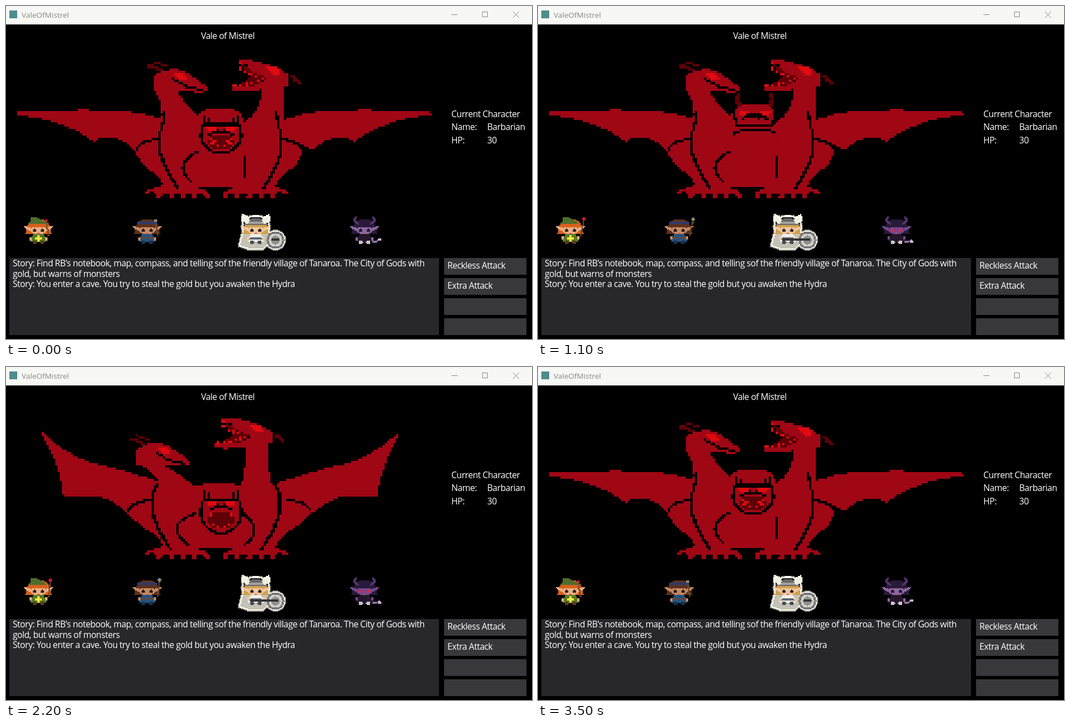
Animation, 939 px wide and 596 px high, one loop 3.53 s. Source, as an HTML page with a canvas:

```html
<!DOCTYPE html>
<html lang="en">
<head>
<meta charset="utf-8">
<title>ValeOfMistrel</title>
<style>
  html, body { margin: 0; width: 100%; height: 100%; overflow: hidden; background: #000; }
  svg, canvas { position: absolute; left: 0; top: 0; }
  text { font-family: "Open Sans", "Noto Sans", sans-serif; font-size: 15.6px; letter-spacing: -.48px; fill: #fff; }
  .bar text { font-size: 13.5px; letter-spacing: 0; fill: #878787; }
  .bar path { fill: none; stroke: #858585; }
</style>
</head>
<body>
<svg width="939" height="596">
  <g class="bar">
    <rect width="939" height="33" fill="#f7f7f3"/>
    <rect x="6" y="8" width="14" height="14" fill="#4d8c8e"/>
    <text x="28" y="21">ValeOfMistrel</text>
    <path d="M795 15.5h11M850.5 10.5h9v9h-9zM905 10l11 11m0-11l-11 11"/>
  </g>
  <g fill="#28282b">
    <rect x="6" y="451" width="767" height="138"/>
    <g fill="#38383a">
      <rect x="782" y="451" width="147" height="30"/>
      <rect x="782" y="487" width="147" height="30"/>
      <rect x="782" y="523" width="147" height="30"/>
      <rect x="782" y="559" width="147" height="30"/>
    </g>
  </g>
  <text x="396" y="59" text-anchor="middle">Vale of Mistrel</text>
  <text x="795" y="199">Current Character</text>
  <text x="795" y="222">Name:</text><text x="859" y="222">Barbarian</text>
  <text x="795" y="246">HP:</text><text x="859" y="246">30</text>
  <text x="12" y="466">Story: Find RB's notebook, map, compass, and telling sof the friendly village of Tanaroa. The City of Gods with</text>
  <text x="12" y="485">gold, but warns of monsters</text>
  <text x="12" y="503">Story: You enter a cave. You try to steal the gold but you awaken the Hydra</text>
  <text x="788" y="470">Reckless Attack</text>
  <text x="788" y="506">Extra Attack</text>
</svg>
<canvas id="stage" width="939" height="450"></canvas>
<script>
const LOOP = 3530, FPS = 30;
const FIRST_CHANGE = 20, HOLD = 145.3;
const ROAR = 0, RISE = 1, PEEK = 2;
const RED = '#a00715', BRIGHT = '#e00a10', DARK = '#5e0008', BLACK = '#000';

const stage = document.getElementById('stage').getContext('2d');
stage.imageSmoothingEnabled = false;

const box = (x, y, w, h) => `M${x} ${y}h${w}v${h}h${-w}z`;
const oval = (x, y, rx, ry = rx) =>
  `M${x - rx} ${y}a${rx} ${ry} 0 1 0 ${2 * rx} 0a${rx} ${ry} 0 1 0 ${-2 * rx} 0z`;

// A band of the stage where each shape is cut to hard square cells
function pixelLayer(cell, top, height) {
  const w = Math.ceil(939 / cell), h = Math.ceil(height / cell);
  const [scratch, layer] = [0, 1].map(() => {
    const canvas = document.createElement('canvas');
    canvas.width = w;
    canvas.height = h;
    return canvas.getContext('2d', { willReadFrequently: true });
  });

  function paint(color, d, { width, dx = 0, dy = 0, mirror, dash = [] } = {}) {
    const shape = new Path2D(d), path = new Path2D();
    path.addPath(shape, new DOMMatrix([1, 0, 0, 1, dx, dy]));
    if (mirror) path.addPath(shape, new DOMMatrix([-1, 0, 0, 1, mirror, dy]));
    scratch.setTransform(1, 0, 0, 1, 0, 0);
    scratch.clearRect(0, 0, w, h);
    scratch.setTransform(1 / cell, 0, 0, 1 / cell, 0, -top / cell);
    scratch.fillStyle = scratch.strokeStyle = color;
    scratch.lineWidth = width;
    scratch.setLineDash(dash);
    if (width) scratch.stroke(path); else scratch.fill(path);
    const image = scratch.getImageData(0, 0, w, h);
    for (let i = 3; i < image.data.length; i += 4) image.data[i] = image.data[i] > 118 ? 255 : 0;
    scratch.putImageData(image, 0, 0);
    layer.drawImage(scratch.canvas, 0, 0);
  }

  const show = () => stage.drawImage(layer.canvas, 0, top, w * cell, h * cell);
  return { paint, show };
}

function hydra(pose) {
  const { paint, show } = pixelLayer(4, 84, 264);
  const up = pose === RISE;
  const ink = (d, mirror, dy) => paint(BLACK, d, { width: 4.5, mirror, dy });

  // Wings, thighs and feet come in mirrored pairs
  paint(RED, up
    ? 'M62 114Q120 172 190 180L285 208V238Q235 238 217 262Q190 236 163 231H103Q98 180 62 114Z'
    : 'M19 190Q100 184 205 187Q250 192 290 206V242Q250 240 230 259Q212 238 188 235Q168 232 157 243Q100 200 19 195Z',
  { mirror: up ? 766 : 778 });
  const hip = up ? 217 : 232;
  paint(RED, `M290 232Q${hip + 4} 238 ${hip} 262Q245 290 262 296Q280 312 284 330H345V232Z`, { mirror: 762 });
  paint(RED, 'M268 330Q284 312 312 316Q346 328 354 335H262Z', { mirror: 750 });
  for (let i = 0; i < 6; i++) {
    const x = 250 + i * 22;
    paint(RED, `M${290 + i * 7} 328Q${x} 328 ${x} ${i ? 344 : 336}`, { width: 8, mirror: 750 });
  }

  // Trunk and chest
  paint(RED, 'M276 212L296 318Q384 332 464 318L488 212Z');
  paint(RED, 'M336 210Q342 186 358 186H406Q420 188 426 210V250H336Z', { dy: up ? 23 : 0 });

  // Necks follow their heads
  let dx = up ? -31 : 0, dy = up ? 23 : 0;
  paint(RED, `M${264 + dx} ${124 + dy}v26Q${284 + dx / 2} ${172 + dy / 2} 276 215L345 225L338 ${192 + dy}Q${314 + dx / 2} ${170 + dy / 2} ${304 + dx} ${150 + dy}Z`);
  leftHead(paint, { dx, dy });
  dx = up ? -30 : 0;
  dy = up ? -6 : 0;
  paint(RED, `M${458 + dx} ${136 + dy}Q${458 + dx} 195 420 210L486 250Q${500 + dx} 205 ${497 + dx} 165V${130 + dy}Z`);
  rightHead(paint, { dx, dy });

  // Folds
  const side = up ? 262 : 275;
  ink(`M${side + 8} ${up ? 208 : 186}Q${side + 7} 214 ${side} 226V262Q${side + 9} 295 ${side + 33} 328`, up ? 750 : 766);
  ink(`M${hip} 258Q${hip + 8} 240 ${side} 238`, 762);
  ink(up ? 'M338 262Q278 284 326 318M424 262Q462 292 426 318' : 'M344 260Q296 282 330 314M425 266V310');

  if (pose === PEEK) peekingHead(paint, ink);
  else roaringHead(paint, ink, up ? 25 : 0, up ? 8 : 0);
  return show;
}

function leftHead(paint, at) {
  paint(RED, 'M264 152V124Q290 106 320 118Q340 130 362 148Q352 160 326 152L304 154Z', at);
  paint(BRIGHT, 'M300 121h16l10 10h-16z', at);
  paint(BLACK, 'M298 130Q316 147 350 150', { ...at, width: 4 });
  paint(DARK, 'M251 108h12l16 8M264 100l24 8', { ...at, width: 4.5 });
}

function rightHead(paint, at) {
  paint(DARK, 'M418 104L468 126L440 148H406L436 128Z', at);
  paint(RED, 'M415 96Q470 98 504 122V142L456 150L466 128Q436 120 430 104H416Z', at);
  paint(RED, 'M404 142L440 144L466 132V148Q436 153 404 151Z', at);
  paint(BRIGHT, 'M462 110h22l6 12h-14z', at);
  paint(BRIGHT, 'M418 100V114Q436 124 452 126M406 142Q436 140 458 130', { ...at, width: 5, dash: [5, 5] });
  paint(DARK, 'M510 126l16 13M512 132h8', { ...at, width: 4.5 });
}

function roaringHead(paint, ink, dy, gape) {
  const chin = 246 + gape, axis = 768;
  ink(`M354 196V210Q344 226 350 ${chin - 4}Q362 ${chin + 18} 384 ${chin + 18}`, axis, dy);
  ink('M354 212H362V200', axis, dy);
  ink('M362 212H384M362 231Q372 225 384 225', axis, dy);
  paint(BRIGHT, 'M356 217l20-2l3 6l-16 4z', { mirror: axis, dy });
  ink('M376 221h3', axis, dy);
  paint(DARK, `M364 234H404L408 ${chin}L396 ${chin + 10}H372L360 ${chin}Z`, { dy });
  paint(BRIGHT, `M366 236v6h8M366 ${chin}l8 5h10`, { mirror: axis, dy, width: 5, dash: [5, 5] });
}

function peekingHead(paint, ink) {
  const axis = 774;
  paint(DARK, 'M360 156Q350 168 362 180', { mirror: axis, width: 7 });
  paint(RED, 'M352 214V188L362 178H412L422 188V214Z');
  ink('M350 182V198L354 206V214', axis);
  paint(BRIGHT, 'M358 188h18l4 7l-18 3z', { mirror: axis });
  ink('M364 202L374 196H387M378 201h3', axis);
  ink('M354 213H387M348 230Q354 221 387 221', axis);
}

// Shared chibi figure around the vertical line x = c
function hero(paint, c, pose, { hair, skin, cloth, eye, feet }) {
  const pair = { mirror: 2 * c };
  const swing = pose ? 2 : 0;
  paint(hair, oval(c, 396, 20, 15));
  paint(skin, `M${c - 27} 394l12 2v8z`, pair);
  paint(hair, `M${c - 20} 398l-4 10h10z`, pair);
  paint(cloth, `M${c - 9} 408h18l6 14h-30z`);
  paint(skin, oval(c, 401, 14, 8));
  paint(hair, box(c - 14, 390, 28, 5));
  paint(eye, box(c - 9, 399, 4, 5), pair);
  paint('#c0605c', box(c - 2, 406, 4, 2));
  paint(skin, box(c - 16, 414 - swing, 4, 5), pair);
  paint(feet, box(c - 10, 421, 7, 4), { ...pair });
}

function party(pose) {
  const { paint, show } = pixelLayer(2, 368, 72);
  const reach = [0, 7, 10][pose], lift = pose ? -3 : 0;
  const staff = (x, color) => {
    paint('#6a452c', `M${x + 4} 412L${x + reach} ${386 + lift}`, { width: 2.4 });
    paint(color, oval(x + reach, 384 + lift, 3));
  };

  // Elf
  hero(paint, 58, pose, { hair: '#d8601c', skin: '#ecae82', cloth: '#587826', eye: '#30221c', feet: '#5c3920' });
  paint('#4f6e2d', 'M40 390Q46 384 44 377Q62 378 74 390Z');
  paint('#ffe638', box(56, 411, 4, 10) + box(53, 414, 10, 4));
  staff(72, '#d01c36');

  // Ranger
  hero(paint, 252, pose, { hair: '#5a311f', skin: '#c98a63', cloth: '#27537c', eye: '#251a1a', feet: '#18304e' });
  paint('#2c3c70', box(235, 386, 34, 4));
  paint('#70452c', box(241, 414, 22, 2));
  staff(267, '#8b8b78');

  // Barbarian, with a pale glow behind the whole outline
  const horns = 'M424 376Q420 388 432 390L436 382Z';
  const cape = 'M424 406L418 428L434 434H458L472 420V406Z';
  const outline = oval(446, 396, 23, 19) + horns + cape + oval(481, 419, 15);
  paint('#8f8f86', outline, { width: 8 });
  paint('#fffff0', outline, { width: 5 });
  paint('#fffff0', horns, { mirror: 892, width: 6 });
  paint('#18181a', outline);
  paint('#c4c2b6', cape);
  hero(paint, 446, pose, { hair: '#d0a04c', skin: '#f3c6a0', cloth: '#efefe4', eye: '#30242a', feet: '#4b4c54' });
  paint('#68686c', 'M424 392Q446 366 468 392Z');
  paint('#a2a29e', box(430, 387, 32, 3));
  paint('#efefdf', horns, { mirror: 892 });
  paint('#5d6678', box(435, 415, 22, 3));
  ['#77777a', '#d2d2c8', '#8f8f8c'].forEach((color, i) => paint(color, oval(481, 419, 16 - 4 * i)));
  paint('#353536', pose ? box(436, 417, 50, 2) : box(474, 417, 14, 3));

  // Imp
  const skin = pose ? '#74488c' : '#8c68a0';
  hero(paint, 640, pose, { hair: '#281a3a', skin, cloth: '#24172b', eye: pose ? '#e02840' : '#25152c', feet: '#cbc4cf' });
  paint('#54356c', 'M626 378Q616 384 630 390', { mirror: 1280, width: 4 });
  paint('#8d6c9e', `M654 422Q662 424 668 ${pose ? 418 : 416}`, { width: 2.6 });
  paint('#c5b5cc', oval(667, pose ? 421 : 418, 3));
  return show;
}

const poses = [ROAR, RISE, PEEK].map(pose => [hydra(pose), party(pose)]);

function poseAt(t) {
  const clock = Math.floor((t + 5) * FPS / 1000) * 1000 / FPS;
  return Math.floor((clock - FIRST_CHANGE) / HOLD + 1) % poses.length;
}

const start = performance.now();
function tick() {
  stage.clearRect(0, 0, 939, 450);
  for (const show of poses[poseAt((performance.now() - start) % LOOP)]) show();
  requestAnimationFrame(tick);
}
tick();
</script>
</body>
</html>
```
